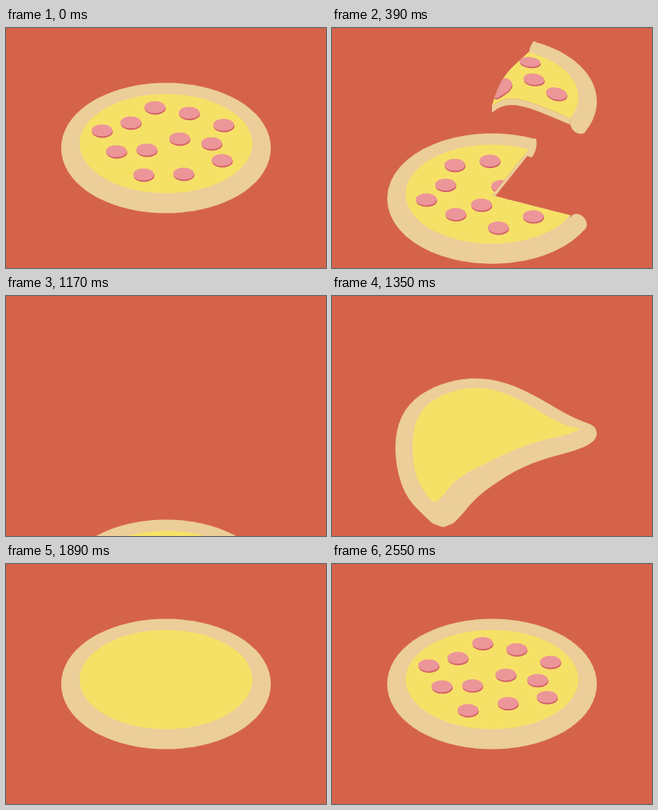
An HTML page with a canvas that plays this animation: 400 by 300 pixels, repeating every 2580 ms.

```html
<!DOCTYPE html>
<html lang="en">
<head>
<meta charset="utf-8">
<title>Pizza loop</title>
<style>
  html, body { margin: 0; width: 100%; height: 100%; overflow: hidden; background: #d5634a; }
  canvas { display: block; width: 400px; height: 300px; }
</style>
</head>
<body>
<canvas id="stage" width="400" height="300"></canvas>
<script>
const ctx = document.getElementById('stage').getContext('2d');
const LOOP = 2580, STEP = 30, TAU = Math.PI * 2, RAD = Math.PI / 180;
const COLOR = { table: '#d5634a', crust: '#ebce99', cheese: '#f6e167', meat: '#ec9699', rim: '#d25f67' };
const TILT = 0.576, TUBE = 11.5;
const CUT = [-37.5 * RAD, 52.5 * RAD];
const MEAT_CENTER = { x: 201, y: 142 };

// Resting places of the toppings, in the order in which they land
const toppings = [
  [186, 99], [138, 154], [272, 121], [217, 138], [120, 128], [229, 106],
  [176, 152], [257, 144], [156, 118], [270, 165], [172, 183], [222, 182]
].map(([x, y]) => {
  const dx = x - MEAT_CENTER.x, dy = (y - MEAT_CENTER.y) / TILT;
  return { radius: Math.hypot(dx, dy), angle: Math.atan2(dy, dx) };
});

const clamp = v => Math.max(0, Math.min(1, v));
const smooth = v => { v = clamp(v); return v * v * (3 - 2 * v); };
const bell = (v, mid, width) => Math.exp(-(((v - mid) / width) ** 2));

function trace(points, close = true) {
  ctx.beginPath();
  points.forEach(([x, y]) => ctx.lineTo(x, y));
  if (close) ctx.closePath();
}

function fill(points, color) {
  trace(points);
  ctx.fillStyle = color;
  ctx.fill();
}

function stroke(points, color, width, close) {
  trace(points, close);
  ctx.strokeStyle = color;
  ctx.lineWidth = width;
  ctx.lineJoin = 'round';
  ctx.stroke();
}

function arc(from, to, count, place) {
  return Array.from({ length: count + 1 }, (_, i) => place(from + (to - from) * i / count));
}

// Vertical shift of a lifted slice: the tip droops, the middle arches
function droop(rho, amount) {
  const s = 1 - Math.min(1, rho);
  return amount * (26 * s ** 5 - 16 * s);
}

function drawTopping({ radius, angle }, turn, dy, bend = 0) {
  const cx = radius * Math.cos(angle + turn), cy = radius * Math.sin(angle + turn);
  const disc = arc(0, TAU, 32, a => {
    const x = cx + 13 * Math.cos(a), y = cy + 13 * Math.sin(a);
    return [MEAT_CENTER.x + x, MEAT_CENTER.y + y * TILT + dy + droop(Math.hypot(x, y) / 108, bend)];
  });
  fill(disc.map(([x, y]) => [x + 0.5, y + 1.8]), COLOR.rim);
  fill(disc, COLOR.meat);
}

function drawPiece(from, to, turn, dy, bend, wallHeight) {
  const crustAt = a => [200 + 119.5 * Math.cos(a), 150 + 70 * Math.sin(a) + dy];
  const cheeseAt = (rho, a) =>
    [200 + 108 * rho * Math.cos(a), 146 - 1.5 * rho + 62 * rho * Math.sin(a) + dy + droop(rho, bend)];
  const edge = a => arc(0, 1, 16, rho => cheeseAt(rho, a));
  const rimLine = arc(from, to, 40, crustAt);

  stroke(rimLine, COLOR.crust, TUBE * 2, false);
  fill([...rimLine, ...arc(to, from, 40, a => cheeseAt(0.9, a))], COLOR.crust);
  for (const a of [from, to]) {
    const [x, y] = crustAt(a);
    fill(arc(0, TAU, 28, p => [
      x + TUBE * Math.cos(p) * Math.cos(a),
      y + TUBE * (Math.cos(p) * Math.sin(a) * TILT + Math.sin(p) * 0.9)
    ]), COLOR.crust);
    const side = edge(a);
    fill([...side, ...side.map(([px, py]) => [px, py + wallHeight]).reverse()], COLOR.crust);
  }

  const top = [...edge(from), ...arc(from, to, 40, a => cheeseAt(1, a)), ...edge(to).reverse()];
  fill(top, COLOR.cheese);
  ctx.save();
  trace(top);
  ctx.clip();
  toppings.forEach(item => drawTopping(item, turn, dy, bend));
  ctx.restore();
}

// Height of the tossed dough's rim, by angle in degrees
function saddle(deg) {
  const a = deg * RAD;
  return -70 - 17.6 * Math.cos(a) - 18.9 * Math.sin(a)
    + 8.25 * Math.cos(2 * a) - 35 * Math.sin(2 * a)
    + 5 * Math.cos(3 * a) + 4.1 * Math.sin(3 * a)
    - 5.6 * Math.cos(4 * a) + 24 * bell(deg, 123, 12);
}

function drawDough(dy, bend) {
  const ring = (rx, ry, cy, lag) => arc(0, 360, 72, deg => {
    const a = deg * RAD;
    const lift = saddle(deg - lag * bell(deg, 135, 45)) + 70;
    return [200 + 7 * bend + rx * Math.cos(a), cy + dy + ry * Math.sin(a) + bend * lift];
  });
  const crust = ring(119.5 - 4.5 * bend, 70, 150, 0);
  fill(crust, COLOR.crust);
  stroke(crust, COLOR.crust, TUBE * 2 - 5 * bend, true);
  fill(ring(108 - 5 * bend, 62, 144.5, 13), COLOR.cheese);
}

function drawSplit(t) {
  const turn = -(0.0484 * t + 5.55e-5 * t * t) * RAD;
  const gap = 329 * (1 - Math.cos(Math.PI * t / 1350)) / 2;
  if (t === 0) {
    drawDough(0, 0);
    toppings.forEach(item => drawTopping(item, turn, 0));
    return;
  }
  const grow = smooth(t / 360);
  drawPiece(CUT[1] + turn, CUT[0] + TAU + turn, turn, gap, 0, 6 * grow);
  drawPiece(CUT[0] + turn, CUT[1] + turn, turn, -0.92 * gap, grow, 8 * grow);
}

function drawToss(t) {
  const s = Math.min(t - 1170, 690);
  const height = s < 690 ? 211 - 1.2596 * s + 0.001382 * s * s : 0;
  drawDough(height, Math.max(0, Math.sin(Math.PI * s / 690)));
}

function drawRain(t) {
  const turn = -0.0559 * (t - LOOP) * RAD;
  toppings.forEach((item, i) => {
    const fall = clamp((t - 1903 - 33 * i) / 290);
    if (fall > 0) drawTopping(item, turn, -210 * (1 - fall * fall));
  });
}

function draw(t) {
  ctx.fillStyle = COLOR.table;
  ctx.fillRect(0, 0, 400, 300);
  if (t <= 870) drawSplit(t);
  if (t >= 1170) {
    drawToss(t);
    drawRain(t);
  }
}

const start = performance.now();
function tick() {
  const t = (performance.now() - start) % LOOP;
  draw(Math.floor(t / STEP) * STEP);
  requestAnimationFrame(tick);
}
tick();
</script>
</body>
</html>
```
